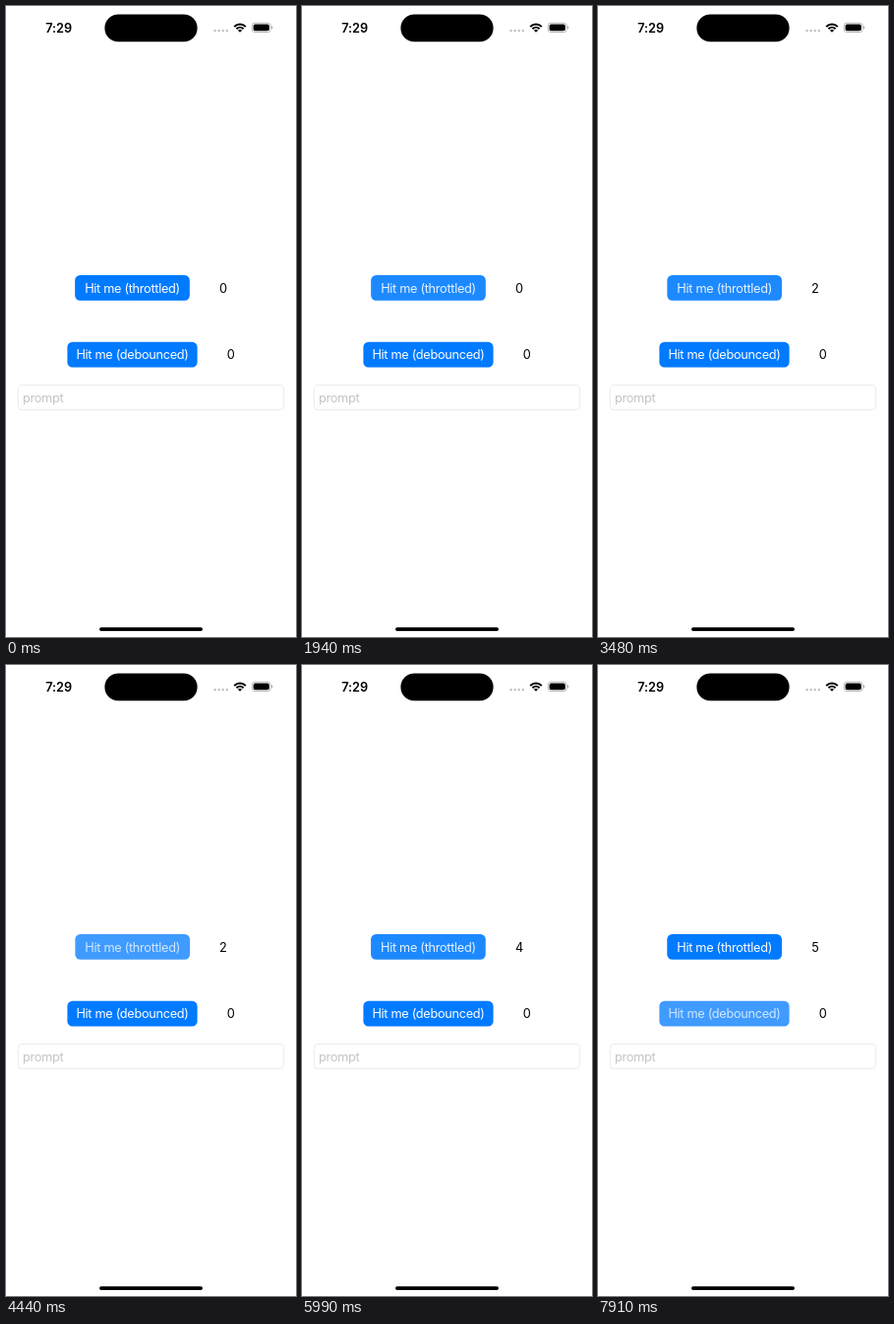
These frames come from a looping animation (295x640 px, 8 s). An HTML page with a canvas:

```html
<!DOCTYPE html>
<html lang="en">
<head>
<meta charset="utf-8">
<title>Throttle and debounce</title>
<style>
  html, body { margin: 0; width: 100%; height: 100%; overflow: hidden; background: #fff; }
  canvas { display: block; width: 295px; height: 640px; }
</style>
</head>
<body>
<canvas id="stage"></canvas>
<script>
const W = 295, H = 640, LOOP = 8000, STEP = 110;
const BLUE = '#007aff';
const FONT = 'Inter, "Open Sans", sans-serif';
const GAP = 30;
const DIGIT_WIDTH = [8, 5.9, 7.6, 7.8, 8.2, 7.7];
const COUNT_TIMES = [2390, 3480, 4550, 5660, 6750];
const FADE = [1, 0.45];

const canvas = document.getElementById('stage');
const ctx = canvas.getContext('2d');
const dpr = window.devicePixelRatio || 1;
canvas.width = Math.round(W * dpr);
canvas.height = Math.round(H * dpr);

// Taps are counted in screen-refresh steps from the first touch.
const throttledTaps = Array.from({ length: 21 }, (_, k) => k < 18 ? 2 * k : 2 * k + 1);
const debouncedTaps = [0, 3, 5];

function pressLevel(t, start, taps) {
  const step = Math.floor((t - start) / STEP);
  const last = taps.filter(tap => tap <= step).pop();
  return last === undefined ? 0 : FADE[step - last] || 0;
}

function box(x, y, w, h, r, fill) {
  ctx.beginPath();
  ctx.roundRect(x, y, w, h, r);
  if (fill) {
    ctx.fillStyle = fill;
    ctx.fill();
  }
}

function text(str, x, y, { color = '#000', align = 'center', weight = 400, size = 12.76, spacing = -0.32 } = {}) {
  ctx.font = `${weight} ${size}px ${FONT}`;
  ctx.letterSpacing = spacing + 'px';
  ctx.textAlign = align;
  ctx.fillStyle = color;
  ctx.fillText(str, x, y);
}

function row(label, width, top, count, level) {
  const digit = DIGIT_WIDTH[count];
  const left = (W - width - GAP - digit) / 2;
  const baseline = top + 17.6;
  ctx.globalAlpha = 1 - 0.25 * level;
  box(left, top, width, 25.8, 5.2, BLUE);
  text(label, left + width / 2, baseline, { color: '#fff' });
  ctx.globalAlpha = 1;
  text(String(count), left + width + GAP + digit / 2, baseline);
}

function wifi(x, y) {
  const from = -Math.PI * 0.75, to = -Math.PI * 0.25;
  ctx.strokeStyle = ctx.fillStyle = '#000';
  ctx.lineWidth = 2;
  for (const r of [8.2, 5]) {
    ctx.beginPath();
    ctx.arc(x, y, r, from, to);
    ctx.stroke();
  }
  ctx.beginPath();
  ctx.moveTo(x, y);
  ctx.arc(x, y, 2.9, from, to);
  ctx.fill();
}

function battery(x, y) {
  box(x, y, 19, 9.4, 3);
  ctx.strokeStyle = '#a5a5a5';
  ctx.lineWidth = 0.8;
  ctx.stroke();
  box(x + 1.4, y + 1.4, 16.2, 6.6, 1.8, '#000');
  box(x + 20, y + 3.1, 1, 3.2, [0, 1, 1, 0], '#a5a5a5');
}

function statusBar() {
  text('7:29', 53.6, 26.6, { weight: 600, spacing: -0.1 });
  box(100.4, 8.5, 94.2, 27.8, 13.9, '#000');
  for (let i = 0; i < 4; i++) box(211.2 + i * 4.1, 23.8, 2.6, 2.6, 1.3, '#c4c4c4');
  wifi(238, 26.8);
  battery(250.2, 17.2);
}

function promptField() {
  box(12.3, 384.4, 270.4, 25.2, 4);
  ctx.strokeStyle = '#e4e4e4';
  ctx.lineWidth = 0.75;
  ctx.stroke();
  text('prompt', 17, 402.2, { color: '#c4c4c6', align: 'left' });
}

function draw(t) {
  ctx.setTransform(dpr, 0, 0, dpr, 0, 0);
  ctx.fillStyle = '#fff';
  ctx.fillRect(0, 0, W, H);
  statusBar();
  const count = COUNT_TIMES.filter(at => t >= at).length;
  row('Hit me (throttled)', 116.7, 273, count, pressLevel(t, 1355, throttledTaps));
  row('Hit me (debounced)', 132.2, 340.8, 0, pressLevel(t, 7355, debouncedTaps));
  promptField();
  box(95, 630.2, 105, 3.8, 1.9, '#000');
}

const start = performance.now();
function tick() {
  draw((performance.now() - start) % LOOP);
  requestAnimationFrame(tick);
}
tick();
</script>
</body>
</html>
```
